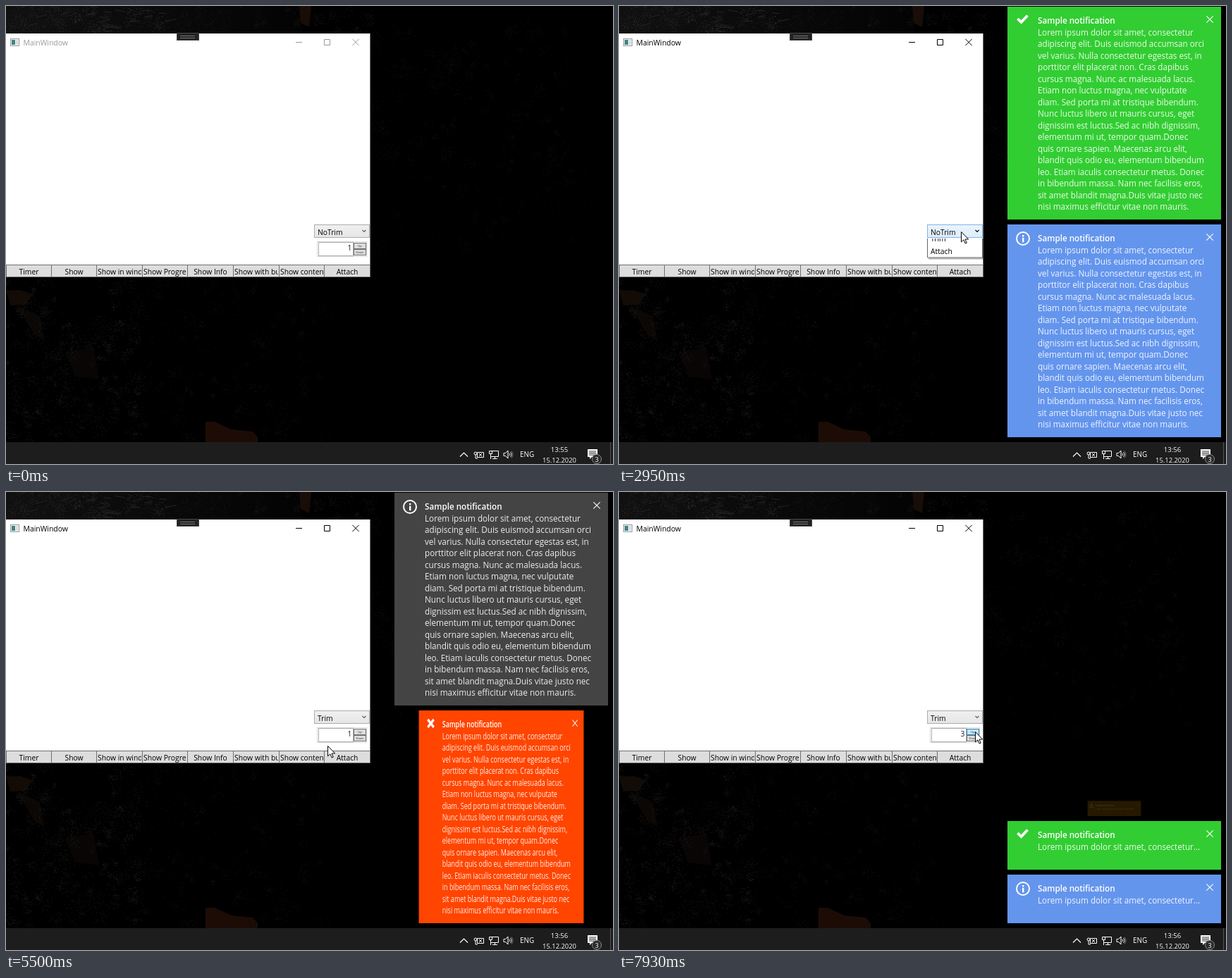
Recreate the animation shown at these times as an HTML page with a canvas. Size 861 px wide and 650 px high, loop 8000 ms.

```html
<!DOCTYPE html>
<html lang="en">
<head>
<meta charset="utf-8">
<title>Notifications demo</title>
<style>
html, body { margin: 0; width: 100%; height: 100%; overflow: hidden; background: #000; }
canvas { display: block; }
</style>
</head>
<body>
<canvas id="stage" width="861" height="650"></canvas>
<script>
const LOOP = 8000, FONT = '"Open Sans", "Noto Sans", sans-serif';
const stage = document.getElementById('stage');
let c = stage.getContext('2d');

// ---- helpers ----
function track(keys, t) {
  if (t <= keys[0][0]) return keys[0].slice(1);
  for (let i = 1; i < keys.length; i++) {
    const a = keys[i - 1], b = keys[i];
    if (t < b[0]) {
      const p = (t - a[0]) / (b[0] - a[0]);
      return a.slice(1).map((v, k) => v + (b[k + 1] - v) * p);
    }
  }
  return keys[keys.length - 1].slice(1);
}
const inside = ([px, py], x, y, w, h) => px >= x && px < x + w && py >= y && py < y + h;

function box(x, y, w, h, fill, border) {
  c.fillStyle = border || fill;
  c.fillRect(x, y, w, h);
  if (border) {
    c.fillStyle = fill;
    c.fillRect(x + 1, y + 1, w - 2, h - 2);
  }
}
function text(s, x, y, color = '#000', size = 10.3, align = 'left', weight = 400) {
  c.font = `${weight} ${size}px ${FONT}`;
  c.textAlign = align;
  c.fillStyle = color;
  c.fillText(s, x, y);
}
function line(points, color, width = 1, closed = false) {
  c.beginPath();
  points.forEach(([x, y]) => c.lineTo(x, y));
  if (closed) c.closePath();
  c.strokeStyle = color;
  c.lineWidth = width;
  c.stroke();
}
function poly(points, color) {
  c.beginPath();
  points.forEach(([x, y]) => c.lineTo(x, y));
  c.fillStyle = color;
  c.fill();
}
function ring(x, y, r, color, width) {
  c.beginPath();
  c.arc(x, y, r, 0, 7);
  c.strokeStyle = color;
  c.lineWidth = width;
  c.stroke();
}
function cross(x, y, r, color, width) {
  line([[x - r, y - r], [x + r, y + r]], color, width);
  line([[x + r, y - r], [x - r, y + r]], color, width);
}
function clipped(x, y, w, h, draw) {
  c.save();
  c.beginPath();
  c.rect(x, y, w, h);
  c.clip();
  draw();
  c.restore();
}

// ---- desktop, painted once ----
let seed = 11;
const rnd = () => (seed = (seed * 16807) % 2147483647) / 2147483647;

function speckle(clusters, x, y, w, h, light) {
  for (let i = 0; i < clusters; i++) {
    const cx = x + rnd() * w, cy = y + rnd() * h, size = 4 + rnd() * 14;
    const v = Math.round(light * (0.4 + rnd() * 0.6));
    c.fillStyle = `rgb(${v},${v},${v})`;
    for (let k = 0; k < 22; k++) {
      c.fillRect(Math.floor(cx + (rnd() - rnd()) * size), Math.floor(cy + (rnd() - rnd()) * size), 1, 1);
    }
  }
}
function paintDesktop() {
  box(0, 0, 861, 650, '#000');
  const glow = c.createLinearGradient(0, 0, 420, 0);
  glow.addColorStop(0, '#101010');
  glow.addColorStop(1, '#030303');
  box(0, 0, 420, 39, glow);
  poly([[0, 404], [20, 403], [38, 409], [28, 424], [6, 425]], '#120b06');
  poly([[15, 425], [48, 440], [55, 476], [40, 466]], '#0b0704');
  poly([[84, 492], [124, 484], [132, 530], [98, 526]], '#080504');
  poly([[416, 0], [433, 0], [430, 30], [418, 24]], '#190d07');
  poly([[283, 590], [296, 590], [320, 601], [350, 604], [357, 612], [357, 619], [283, 619]], '#1d0c06');
  speckle(110, 0, 0, 230, 36, 36);
  speckle(50, 230, 0, 300, 36, 20);
  speckle(170, 0, 386, 190, 230, 22);
  speckle(110, 150, 386, 300, 230, 13);
  speckle(110, 520, 30, 280, 200, 13);
  speckle(60, 520, 220, 320, 130, 8);
  for (let i = 0; i < 26; i++) {
    const x = rnd() * 240, y = rnd() * 36;
    line([[x, y], [x + 5 + rnd() * 12, y - 5 + rnd() * 8]], '#242424');
  }

  box(0, 619, 861, 31, '#1d1d1d');
  const w = '#fff';
  line([[644, 639.5], [649.5, 634], [655, 639.5]], w, 1.2);
  ring(666, 635, 2, w, 1);
  line([[666, 637], [666, 642], [669, 642]], w);
  line([[668.5, 633.5], [677.5, 633.5], [677.5, 640.5], [668.5, 640.5]], w, 1, true);
  cross(673, 637, 2, w, 1);
  line([[688.5, 631.5], [698.5, 631.5], [698.5, 639.5], [687.5, 639.5]], w, 1);
  line([[690, 642.5], [697, 642.5]], w);
  line([[693.5, 639], [693.5, 642]], w);
  line([[685.5, 631.5], [689.5, 631.5], [689.5, 635.5], [685.5, 635.5]], w, 1, true);
  line([[687.5, 636], [687.5, 643]], w);
  line([[706, 634.5], [708.5, 634.5], [712, 631], [712, 642], [708.5, 638.5], [706, 638.5]], w, 1, true);
  for (const r of [2.5, 5, 7]) {
    c.beginPath();
    c.arc(712, 636.5, r, -0.8, 0.8);
    c.strokeStyle = r > 6 ? '#777' : w;
    c.stroke();
  }
  text('ENG', 729, 640, w, 9.9);
  text('15.12.2020', 785, 648, w, 9.4, 'center');
  poly([[825, 629], [839, 629], [839, 640], [831, 640], [828, 643], [828, 640], [825, 640]], w);
  for (const y of [632, 634.5, 637]) line([[827, y], [837, y]], '#1d1d1d', 1);
  c.beginPath();
  c.arc(838, 643, 7, 0, 7);
  c.fillStyle = '#2b2b2b';
  c.fill();
  ring(838, 643, 6.5, '#8a8a8a', 1);
  text('3', 838, 646.5, w, 9, 'center');
  box(857, 619, 1, 31, '#555');
}
const desktop = document.createElement('canvas');
desktop.width = 861;
desktop.height = 650;
{
  const screen = c;
  c = desktop.getContext('2d');
  paintDesktop();
  c = screen;
}

// ---- window ----
const LABELS = ['Timer', 'Show', 'Show in window', 'Show Progress', 'Show Info',
  'Show with button', 'Show content', 'Attach'];
const MODES = ['NoTrim', 'Trim', 'Attach'];

function drawButton(name, i, fill, border) {
  const x = Math.round(i * 64.6) - (i ? 1 : 0), w = Math.round((i + 1) * 64.6) - x;
  box(x, 367, w, 18, fill, border);
  clipped(x + 1, 367, w - 3, 18, () => {
    c.font = `10.3px ${FONT}`;
    const fits = c.measureText(name).width < w - 4;
    text(name, fits ? x + w / 2 : x + 2, 380.7, '#000', 10.3, fits ? 'center' : 'left');
  });
}
function drawWindow(t, cursor) {
  const ink = t >= 1090 ? '#000' : '#999';
  box(0, 39, 517, 346, '#fff');
  box(516, 39, 1, 346, '#777');
  box(6, 46, 13, 11, '#f4f4f4', '#9a9a9a');
  box(8, 48, 5, 7, '#3f8585');
  box(14, 48, 3, 7, '#d5dde6');
  text('MainWindow', 24.5, 55.7, ink, 10.4);
  box(411, 51, 9, 1, ink);
  line([[451.5, 47.5], [459.5, 47.5], [459.5, 55.5], [451.5, 55.5]], ink, 1, true);
  cross(496, 51.5, 4.7, ink, 1);
  box(242, 38, 32, 11, '#222', '#444');
  box(247, 42, 21, 1, '#777');
  box(247, 45, 21, 1, '#777');

  const pressed = (t >= 1390 && t < 1450) || (t >= 6640 && t < 6730);
  const onAttach = inside(cursor, 452, 367, 65, 18);
  LABELS.forEach((name, i) => {
    const hot = i === 7 && onAttach;
    drawButton(name, i, hot ? (pressed ? '#c4e5f6' : '#bee6fd') : '#ddd', hot ? '#3c7fb1' : '#707070');
  });

  const onCombo = inside(cursor, 437, 310, 79, 20);
  const shade = c.createLinearGradient(0, 310, 0, 330);
  shade.addColorStop(0, onCombo ? '#ecf4fc' : '#f0f0f0');
  shade.addColorStop(1, onCombo ? '#dcecfc' : '#e5e5e5');
  box(437, 310, 79, 19, shade, onCombo ? '#7eb4ea' : '#acacac');
  text(MODES[t < 5170 ? 0 : 1], 442, 324.5);
  line([[505.5, 318], [508, 320.5], [510.5, 318]], onCombo ? '#000' : '#606060', 1.2);

  box(441, 334, 71, 22, '#fff', '#d8d8d8');
  box(443, 335, 50, 20, '#fff', '#abadb3');
  text(t < 7270 ? '1' : t < 7750 ? '2' : '3', 490.5, 347.2, '#1a1a2a', 10.3, 'right');
  const onUp = inside(cursor, 493, 336, 18, 9);
  box(493, 336, 18, 9, onUp ? '#bee6fd' : '#ddd', onUp ? '#3c7fb1' : '#707070');
  box(493, 345, 18, 9, '#ddd', '#707070');
  text('Up', 502, 342.2, '#333', 4, 'center');
  text('Down', 502, 351.2, '#333', 4, 'center');

  if (t >= 2890 && t < 5170) drawPopup(track([[2890, 0.05], [2950, 0.5], [4059, 0.5], [4090, 1]], t)[0], cursor[1]);
}
function drawPopup(open, pointerY) {
  const shown = 55 * open, hover = pointerY < 348 ? 0 : pointerY < 366 ? 1 : 2;
  box(439, 330, 79, shown + 2, 'rgba(0,0,0,.3)');
  clipped(437, 330, 79, shown, () => {
    c.translate(0, shown - 55);
    box(437, 330, 79, 55, '#fff', '#646464');
    if (open === 1 && pointerY > 330) box(438, 331 + hover * 17.5, 77, 18, '#b4e0f5', '#26a0da');
    MODES.forEach((name, i) => text(name, 442, 343.7 + i * 18, '#000'));
  });
}

// ---- notifications ----
const BODY = ['Lorem ipsum dolor sit amet, consectetur', 'adipiscing elit. Duis euismod accumsan orci',
  'vel varius. Nulla consectetur egestas est, in', 'porttitor elit placerat non. Cras dapibus',
  'cursus magna. Nunc ac malesuada lacus.', 'Etiam non luctus magna, nec vulputate',
  'diam. Sed porta mi at tristique bibendum.', 'Nunc luctus libero ut mauris cursus, eget',
  'dignissim est luctus.Sed ac nibh dignissim,', 'elementum mi ut, tempor quam.Donec',
  'quis ornare sapien. Maecenas arcu elit,', 'blandit quis odio eu, elementum bibendum',
  'leo. Etiam iaculis consectetur metus. Donec', 'in bibendum massa. Nam nec facilisis eros,',
  'sit amet blandit magna.Duis vitae justo nec', 'nisi maximus efficitur vitae non mauris.'];
const WIDTH = 303, RIGHT = 854, BOTTOM = 612, GAP = 7;

const ICONS = {
  info() {
    ring(22, 20, 9, '#fff', 2);
    box(21, 15, 2.4, 2.4, '#fff');
    box(21, 18.8, 2.4, 6.5, '#fff');
  },
  check() { line([[14.5, 17], [19.5, 22], [28.5, 12.5]], '#fff', 3.8); },
  warn() {
    line([[22, 11.5], [32, 29.5], [12, 29.5]], '#fff', 2, true);
    box(21, 17.5, 2.2, 6, '#fff');
    box(21, 25, 2.2, 2.2, '#fff');
  },
  error() { cross(22, 18.3, 5.5, '#fff', 3.8); },
  none() {}
};
const BLUE = '#6495ed', GREEN = '#32cd32', ORANGE = '#ffa500', RED = '#ff4500', GREY = '#444';

// born: first faint appearance; grow: from, to; close: width over time
const NOTES = [
  { color: BLUE, icon: 'info', born: 1480, grow: [2070, 2250], close: [[4269, 1], [4270, 0]] },
  { color: GREEN, icon: 'check', born: 2500, grow: [2500, 2690], close: [[4450, 1], [4480, 0.927], [4650, 0.927], [4810, 0]] },
  { color: ORANGE, icon: 'warn', born: 4270, grow: [4270, 4460], close: [[5139, 1], [5140, 0.6], [5320, 0]] },
  { color: RED, icon: 'error', born: 4810, grow: [5130, 5310], close: [[5430, 1], [5500, 0.775], [5740, 0]] },
  { color: GREY, icon: 'info', born: 5320, grow: [5320, 5490], close: [[5800, 1], [6100, 0]] },
  { color: GREY, icon: 'none', born: 5740, grow: [5740, 5920], close: [[6279, 1], [6280, 0.553], [6460, 0]] },
  { color: BLUE, icon: 'info', born: 6940, grow: [7230, 7430], trim: true },
  { color: GREEN, icon: 'check', born: 7450, grow: [7710, 7910], trim: true },
  { color: ORANGE, icon: 'warn', born: 7930, grow: [8000, 8200], trim: true }
];

function drawNote({ color, icon, trim }, height) {
  box(0, 0, WIDTH, height, color);
  ICONS[icon]();
  text('Sample notification', 43, 23.8, '#fff', 11.7, 'left', 600);
  const lines = trim ? [BODY[0] + '...'] : BODY;
  lines.forEach((s, i) => text(s, 43, 40.7 + i * 16.5, 'rgba(255,255,255,.9)', 11.7));
  cross(287, 18, 4.7, '#fff', 1.1);
}
function drawNotes(t) {
  const live = NOTES.filter(n => t >= n.born && (!n.close || t < n.close[n.close.length - 1][0])).map(n => {
    const [p] = track([[n.grow[0], 0], [n.grow[1], 1]], t);
    const shrink = n.close ? track(n.close, t)[0] : 1;
    return { n, sx: (0.25 + 0.75 * p) * shrink, sy: 0.315 + 0.685 * p, alpha: 0.15 + 0.85 * p };
  });
  // The stack is as wide as its widest item and stays docked to the right.
  const middle = RIGHT - WIDTH * Math.max(0, ...live.map(v => v.sx)) / 2;
  let bottom = BOTTOM;
  for (const { n, sx, sy, alpha } of live) {
    const height = n.trim ? 69 : 302;
    c.save();
    c.globalAlpha = alpha;
    c.translate(middle - WIDTH * sx / 2, bottom - height * sy);
    c.scale(sx, sy);
    drawNote(n, height);
    c.restore();
    bottom -= height + GAP;
  }
}

// ---- pointer ----
const PATH = [[100, 843, 55], [560, 843, 55], [680, 770, 120], [820, 630, 245], [980, 515, 352], [1130, 486, 373],
  [2475, 486, 373], [2890, 485, 320], [4260, 485, 320], [4450, 465, 357], [5140, 465, 357], [5500, 456, 360],
  [5930, 444, 361], [6100, 503, 361], [6280, 503, 361], [6450, 490, 374], [6740, 490, 374], [6930, 505, 340]];

function drawPointer([x, y]) {
  c.save();
  c.translate(x + 0.5, y + 0.5);
  c.scale(0.9, 0.9);
  const arrow = [[0, 0], [0, 16], [3.7, 12.6], [6.3, 18.4], [8.6, 17.4], [6.1, 11.8], [11.3, 11.6]];
  poly(arrow, '#fff');
  line(arrow, '#000', 1.1, true);
  c.restore();
}

function frame() {
  const t = performance.now() % LOOP, cursor = track(PATH, t);
  c.drawImage(desktop, 0, 0);
  text(t < 900 ? '13:55' : '13:56', 785, 632.5, '#fff', 9.6, 'center');
  drawWindow(t, cursor);
  drawNotes(t);
  if (t >= 100) drawPointer(cursor);
  requestAnimationFrame(frame);
}
requestAnimationFrame(frame);
</script>
</body>
</html>
```
